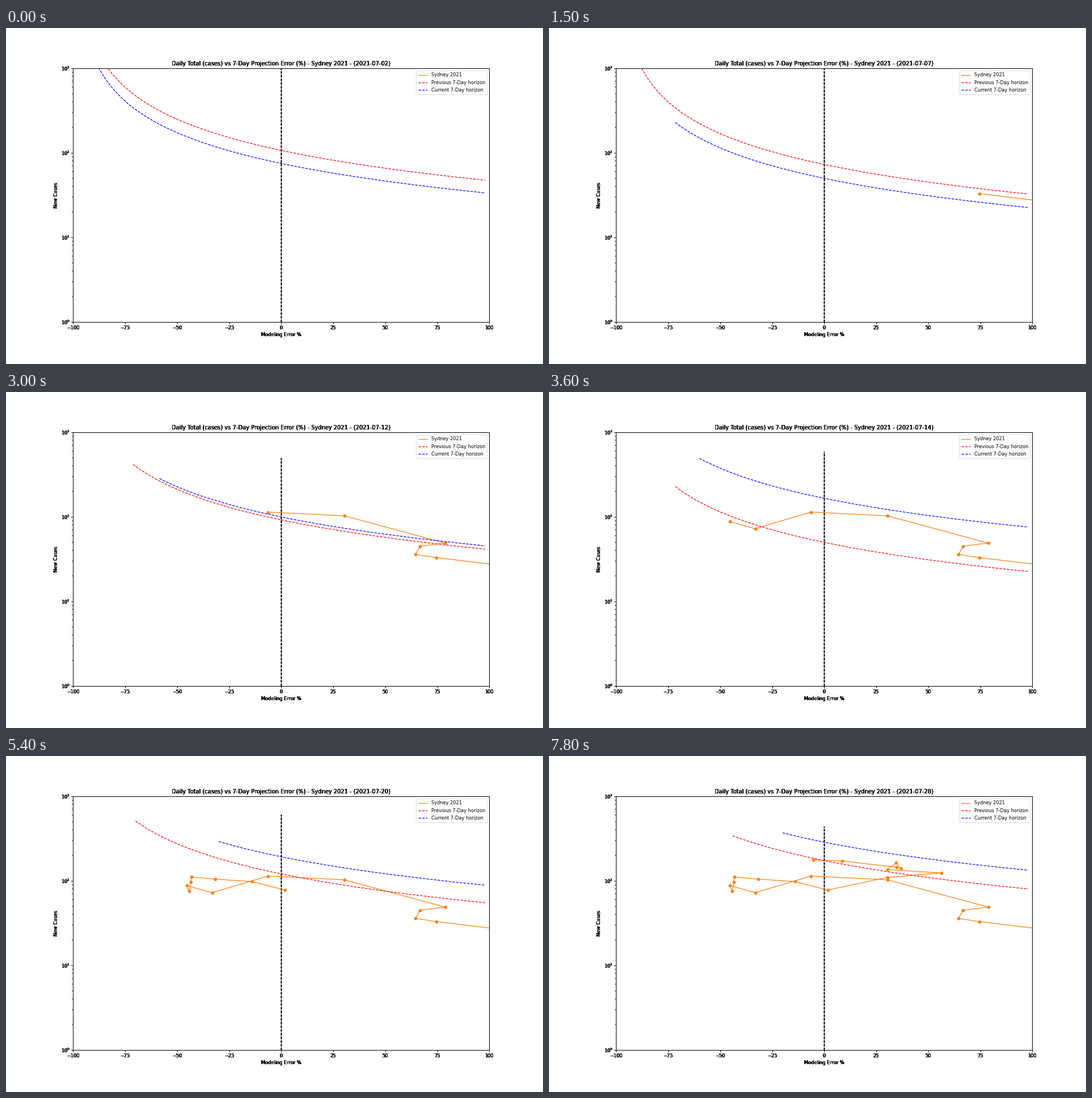
Write a matplotlib script that moves like this. It is 947 px wide and 592 px high and loops after 8000 ms.

```python
import numpy as np
import matplotlib.pyplot as plt
from matplotlib.animation import FuncAnimation

DPI = 59.2
TICK_MS, DAY_MS, LOOP_MS = 100, 300, 8000
FIRST_DAY = 2      # day of July shown at the start
HORIZON = 7
RIGHT_END = 98
ORANGE = "#ff7f0e"

# Turning points: day of July, cases at zero error, left end (%)
KEYS = np.array([
    (-5, 107, -92), (0, 73, -92), (2, 75, -92), (3, 86, -70.5),
    (4, 125, -71), (7, 50, -71.5), (10, 68, -35.5), (13, 121, -70),
    (14, 166, -60), (17, 205, -64), (20, 193, -30), (21, 174, -44),
    (24, 214, -24), (28, 287, -20)])

# Observed (error %, cases), one point per day
TRACK_START = 6
TRACK = np.array([
    (125, 23.4), (74.5, 33), (64.6, 36), (66.7, 45), (78.8, 49),
    (30.3, 103), (-6.3, 114), (-33.2, 72.5), (-45.4, 88), (-44.2, 75.5),
    (-43.5, 97), (-43.1, 111), (-31.6, 105), (-14, 98), (1.7, 78),
    (30.5, 110), (56.2, 124), (30.3, 136), (34.6, 163), (36.9, 140),
    (34.7, 145), (8.7, 172), (-5.2, 177)])


def projection(day):
    """Power-law curve of cases against error, flattening slowly by day."""
    days, levels, lefts = KEYS.T
    level = np.exp(np.interp(day, days, np.log(levels)))
    left = np.interp(day, days, lefts)
    growth = np.linspace(np.log1p(left / 100), np.log1p(RIGHT_END / 100), 80)
    steepness = 1.195 - 0.0022 * day - 0.025 * growth
    return 100 * np.expm1(growth), level * np.exp(-steepness * growth)


fig = plt.figure(figsize=(947 / DPI, 592 / DPI), dpi=DPI, facecolor="white")


def add_layer(index):
    ax = fig.add_axes([0.125, 0.125, 0.775, 0.755], facecolor="none",
                      label=f"layer {index}")
    ax.set_yscale("log")
    ax.set(xlim=(-100, 100), ylim=(1, 1000),
           xlabel="Modeling Error %", ylabel="New Cases")
    zero, = ax.plot([], [], "k--")
    return ax, zero, ax.set_title("")


# Stacked copies give the heavy lettering and the dense zero line
layers = [add_layer(i) for i in range(6)]
for lower, _, _ in layers[:-2]:
    lower.minorticks_off()

ax = layers[-1][0]
track, = ax.plot([], [], color=ORANGE, label="Sydney 2021")
dots, = ax.plot([], [], "o", color=ORANGE)
previous, = ax.plot([], [], "r--", label="Previous 7-Day horizon")
current, = ax.plot([], [], "b--", label="Current 7-Day horizon")
ax.legend(loc="upper right")


def update(frame):
    day = FIRST_DAY + frame * TICK_MS // DAY_MS
    old, new = projection(day - HORIZON), projection(day)
    previous.set_data(*old)
    current.set_data(*new)
    seen = TRACK[:max(0, day - TRACK_START + 1)]
    for line in (track, dots):
        line.set_data(*seen.T)
    top = 1.2 * max(old[1].max(), new[1].max())
    for _, zero, title in layers:
        zero.set_data([0, 0], [1, top])
        title.set_text("Daily Total (cases) vs 7-Day Projection Error (%)"
                       f" - Sydney 2021 - (2021-07-{day:02d})")
    return []


anim = FuncAnimation(fig, update, frames=LOOP_MS // TICK_MS,
                     interval=TICK_MS, repeat=True, repeat_delay=0)
plt.show()
```
